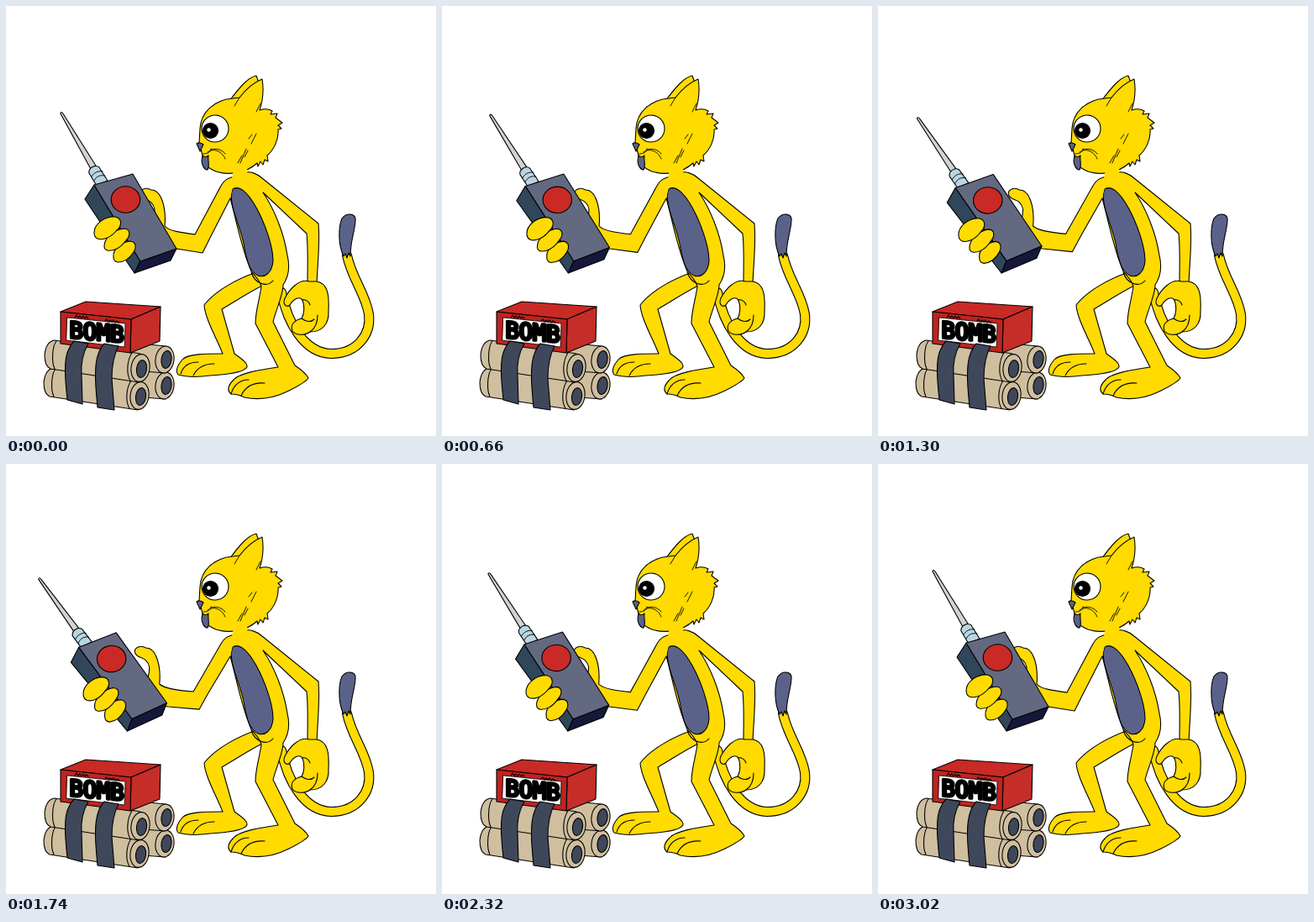
Recreate the animation shown at these times as an HTML page. Size 512 px wide and 512 px high, loop 3040 ms.

```html
<!DOCTYPE html>
<html lang="en">
<head>
<meta charset="utf-8">
<title>Cat with a detonator</title>
<style>
  html, body { margin: 0; width: 100%; height: 100%; overflow: hidden; background: #fff; }
  svg { display: block; width: 100vw; height: 100vh; }
  .ink { stroke: #000; stroke-width: 1.1; stroke-linejoin: round; stroke-linecap: round; }
  .line { fill: none; }
  .fine { stroke-width: .9; }
  .fur { fill: #ffdb00; }
  .patch { fill: #5b628a; }
  .tan { fill: #cfbf9f; }
  .strap { fill: #3f475b; }
  text { font: 27px "DejaVu Sans Mono", monospace; stroke: #000; stroke-width: 3.6; stroke-linejoin: round; }
</style>
</head>
<body>
<svg viewBox="0 0 512 512" class="ink">
  <defs>
    <path id="tail" d="M328 341C335 377 355 413 387 414C419 414 435 390 432 367C428 342 412 325 406 297"/>
    <g id="stick" class="tan">
      <path d="M58 398C50 399 47 406 46 415C46 424 48 430 53 432L158 448L160 414Z"/>
      <path class="line" d="M60 399C55 405 54 424 58 432M150 413C144 422 143 438 148 446"/>
      <ellipse cx="160" cy="431" rx="11" ry="16.5" transform="rotate(8 160 431)"/>
      <ellipse class="strap" cx="161.500" cy="432" rx="6" ry="10.500" transform="rotate(8 161 432)"/>
    </g>
    <g id="end" class="tan">
      <path d="M140 400L190 405V437L150 434Z"/>
      <ellipse cx="189" cy="421" rx="11" ry="16" transform="rotate(8 189 421)"/>
      <ellipse class="strap" cx="191" cy="421" rx="6" ry="10.500" transform="rotate(8 191 421)"/>
    </g>
  </defs>

  <!-- tail -->
  <g class="line">
    <use href="#tail" stroke="#000" stroke-width="12"/>
    <use href="#tail" stroke="#ffdb00" stroke-width="9.800"/>
  </g>
  <path class="patch" d="M402 298C395 284 396 262 400 253C405 246 417 246 416 256C415 270 410 280 410 298L408 294L406 300L404 295Z"/>

  <!-- legs, torso and resting arm -->
  <g class="fur">
    <path d="M299 317C276 324 248 340 236 356C237 372 250 394 258 414C239 414 216 414 210 421C204 428 201 434 205 439C215 442 229 442 243 440C262 439 282 436 286 431C290 427 282 421 272 414L257 361C274 351 289 341 305 333Z"/>
    <path class="line" d="M208 438C211 428 219 424 229 424M223 440C228 430 238 426 248 426"/>
    <path d="M273 203C266 204 262 210 267 229C274 253 279 285 292 316C298 323 303 328 304 334C302 349 297 363 297 378L324 430C303 433 278 437 271 445C264 452 263 458 268 462C276 462 280 464 284 466C302 470 321 466 337 458C347 453 357 448 360 443C357 437 350 432 344 428L318 376C321 363 330 344 330 332C338 320 338 309 335 297C331 270 319 241 306 222L358 271C360 290 359 310 359 331H370C371 306 374 282 372 259L305 205C298 199 289 196 285 199Z"/>
    <path class="line" d="M292 317C296 330 310 336 318 327M268 462C271 451 279 445 289 445M280 464C285 453 295 448 308 449"/>
  </g>
  <path class="patch" d="M270 218C278 213 288 222 298 240C308 258 318 286 318 303C317 318 308 324 300 321C290 316 287 305 283 283C279 262 263 232 270 218Z"/>

  <!-- resting hand -->
  <g class="fur">
    <path d="M361 328C349 324 337 338 332 348C329 355 334 360 338 356C342 349 349 345 353 350C356 358 355 367 352 372C344 374 338 379 341 387C345 393 357 392 362 388C376 388 385 379 384 363C385 344 383 330 370 328Z"/>
    <path class="line" d="M352 372C357 376 363 377 367 373M362 388C368 384 371 376 371 368M352 350C357 349 361 352 362 356"/>
  </g>

  <!-- raised arm, redrawn over time -->
  <path id="arm" class="fur"/>

  <!-- head -->
  <g class="fur">
    <path d="M266 113C278 97 288 85 298 83L301 91L284 114Z"/>
    <path d="M270 110C247 112 232 127 231 146L230 163L234 178C234 187 240 193 250 197C266 202 286 199 299 187L300 191L303 185L306 189L308 183L312 185L311 178C319 171 325 159 324 147L328 146L324 142L329 139L321 133L323 128L315 129L317 125C312 122 308 122 302 124C306 112 307 99 305 87C295 91 285 100 278 109Z"/>
    <path d="M271 194H287L288 205H269Z" stroke="none"/>
    <path class="line fine" d="M278 109L272 119M303 116L298 126M235 176C240 176 244 174 244 170M240 174C248 168 258 174 261 182M244 171C251 169 257 171 261 176M276 187L281 178M279 187L286 170M284 180L288 172M289 158L293 153M292 164L298 152"/>
    <circle cx="249" cy="146" r="16" fill="#fff"/>
    <circle cx="243.500" cy="148.500" r="9" fill="#000"/>
    <circle cx="241.500" cy="147.500" r="2.200" fill="#fff" stroke="none"/>
    <path class="patch" d="M227 164C229 162 233 163 235 165L231 173Z"/>
    <path class="patch" d="M234 178C236 180 239 180 241 178C240 184 243 190 240 195C236 195 233 189 233 184Z"/>
  </g>

  <!-- detonator -->
  <g id="remote">
    <path d="M65 128C65 126 67 126 68 128L107 190L101 194Z" fill="#d2d2d2"/>
    <path d="M108 214L99 199C98 193 106 188 111 192L121 208Z" fill="#b9d5e1"/>
    <path class="line fine" d="M102 203C105 198 110 196 115 197M105 208C108 202 113 201 118 202"/>
    <path d="M94 230L105 213L160 304L153 318Z" fill="#30465a"/>
    <path d="M160 304L203 289L196 303L153 318Z" fill="#15183a"/>
    <path d="M105 213L151 200L203 289L160 304Z" fill="#626981"/>
    <ellipse cx="142.500" cy="230.500" rx="17.200" ry="15.700" fill="#c92a25"/>
    <g class="fur">
      <path d="M128 299C127 289 137 281 148 280C156 281 155 289 152 293C147 301 140 305 133 305Q128 304 128 299Z"/>
      <path d="M117 286C117 276 129 266 141 265C149 266 148 274 143 279C136 289 127 292 121 291Q117 290 117 286Z"/>
      <path d="M105 270C105 260 117 250 130 251C139 253 138 262 132 267C124 277 114 279 109 277Q105 275 105 270Z"/>
    </g>
  </g>

  <!-- bomb -->
  <use href="#end" y="31"/>
  <use href="#end"/>
  <use href="#stick" x="-1" y="33"/>
  <use href="#stick"/>
  <path d="M65 364L95 352L184 358L149 373Z" fill="#c92a25"/>
  <path d="M149 373L184 358L183 399L148 413Z" fill="#c52d28"/>
  <path d="M65 364L149 373L148 413L65 402Z" fill="#bf231f"/>
  <path d="M73 371L142 378L141 406L72 398Z" fill="#fff" stroke-width=".8"/>
  <path class="strap" d="M81 399L98 402C91 414 89 427 90 440L91 474L73 469C71 449 68 423 74 410Q77 403 81 399Z"/>
  <path class="strap" d="M117 402L134 405C127 418 126 431 126 444L129 481L109 478C107 456 104 430 110 414Q113 406 117 402Z"/>
  <path class="line" d="M82 371L84 368L86 371L88 369L90 372L92 369L94 372L96 370L98 372M118 375L120 373L122 376L124 374L126 376L128 374L130 377L132 375L135 377"/>
  <text transform="translate(75.500 395) skewY(5)">BOMB</text>
</svg>
<script>
  const LOOP = 3040, SWING = 741, SWINGS = 4, REACH = 1.37;
  const arm = document.getElementById("arm");
  const remote = document.getElementById("remote");

  // Linear back-and-forth, resting briefly before the loop restarts.
  function swingAt(t) {
    if (t >= SWING * SWINGS) return 0;
    const phase = t / SWING % 1;
    return REACH * (1 - Math.abs(2 * phase - 1));
  }

  function armPath(s) {
    const p = (x, y, dx = 0, dy = 0) => `${x + dx * s} ${y + dy * s} `;
    const hand = (x, y) => p(x, y, -6.5);
    return "M" + p(273, 203) + "C" + p(264, 204) + p(259, 208) + p(256, 214) +
      "L" + p(225, 272, -2, -1) +
      "C" + p(210, 270, -2) + p(194, 268, -5) + hand(189, 262) +
      "C" + hand(191, 240) + hand(185, 219) + hand(173, 219) +
      "C" + hand(166, 215) + hand(158, 219) + hand(160, 225) +
      "C" + hand(163, 233) + hand(174, 228) + hand(177, 242) +
      "Q" + hand(177, 253) + hand(172, 262) +
      "L" + p(178, 284, -7, 2) + "L" + p(203, 289, -10) +
      "L" + p(234, 294, -4, -2) + "L" + p(243, 276, -3, -2) + "L" + p(267, 229);
  }

  function draw(t) {
    const s = swingAt(t % LOOP);
    arm.setAttribute("d", armPath(s));
    remote.setAttribute("transform", `rotate(${-5.7 * s} 150 408)`);
  }

  const start = performance.now();
  function tick(now) {
    draw(Math.max(0, now - start));
    requestAnimationFrame(tick);
  }
  draw(0);
  requestAnimationFrame(tick);
</script>
</body>
</html>
```
